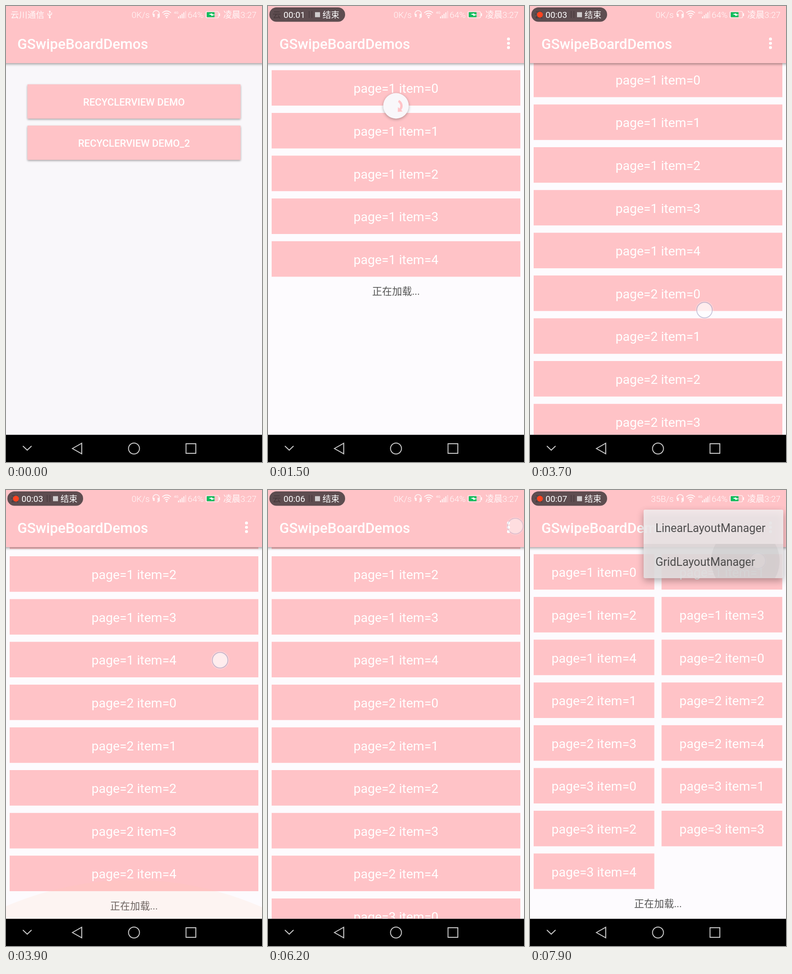
An HTML page with a canvas that plays this animation: 561x998 px, repeating every 8 s.

```html
<!DOCTYPE html>
<html lang="zh-CN">
<head>
<meta charset="utf-8">
<title>Refresh list demo</title>
<style>
html, body { margin: 0; width: 100%; height: 100%; overflow: hidden; background: #fdfbfe; }
canvas { display: block; width: 561px; height: 998px; }
</style>
</head>
<body>
<canvas id="stage"></canvas>
<script>
const W = 561, H = 998, LOOP = 8000;
const PINK = '#ffc3c7', TOP = 125, NAV = 938.5;
const ROW = 93.6, ROW_H = 77.7, FIRST = 140.4;
const FAMILY = 'Roboto, "Noto Sans CJK SC", "Noto Sans CJK", sans-serif';

const canvas = document.getElementById('stage');
const ctx = canvas.getContext('2d');
const dpr = window.devicePixelRatio || 1;
canvas.width = W * dpr;
canvas.height = H * dpr;

const clamp = v => Math.max(0, Math.min(1, v));
const span = (t, a, b) => clamp((t - a) / (b - a));
const smooth = p => (1 - Math.cos(Math.PI * p)) / 2;
const out = p => 1 - (1 - p) ** 3;

// Linear interpolation over [time, value] keys
function track(t, keys) {
  let [a, v] = keys[0];
  for (const [b, w] of keys) {
    if (t < b) return v + (w - v) * span(t, a, b);
    [a, v] = [b, w];
  }
  return v;
}

function text(s, x, y, size, color = '#fff', align = 'left', weight = 400) {
  ctx.font = `${weight} ${size}px ${FAMILY}`;
  ctx.fillStyle = color;
  ctx.textAlign = align;
  ctx.fillText(s, x, y);
}

function rect(x, y, w, h, color, r = 0) {
  ctx.fillStyle = color;
  ctx.beginPath();
  ctx.roundRect(x, y, w, h, r);
  ctx.fill();
}

function disc(x, y, r, color) {
  ctx.fillStyle = color;
  ctx.beginPath();
  ctx.arc(x, y, Math.max(0, r), 0, 7);
  ctx.fill();
}

function stroke(path, color, width) {
  ctx.strokeStyle = color;
  ctx.lineWidth = width;
  ctx.stroke(new Path2D(path));
}

function layer(alpha, draw) {
  if (alpha <= 0) return;
  ctx.save();
  ctx.globalAlpha *= alpha;
  draw();
  ctx.restore();
}

function shadow(alpha, blur, dy) {
  ctx.shadowColor = `rgba(0,0,0,${alpha})`;
  ctx.shadowBlur = blur * dpr;
  ctx.shadowOffsetY = dy * dpr;
}

function clipTo(x, y, w, h) {
  ctx.beginPath();
  ctx.rect(x, y, w, h);
  ctx.clip();
}

function toolbar(withMenu) {
  layer(1, () => {
    shadow(0.4, 6, 2);
    rect(-10, -100, W + 20, TOP + 100, PINK);
  });
  text('GSwipeBoardDemos', 25, 93.5, 31.2, '#fff', 'left', 500);
  if (withMenu) for (const y of [72.3, 81.6, 91]) disc(527, y, 3.2, '#fff');
}

function home(t) {
  rect(0, 0, W, H, '#f9f7fa');
  toolbar(false);
  ['RECYCLERVIEW DEMO', 'RECYCLERVIEW DEMO_2'].forEach((label, i) => {
    const y = 171.5 + i * 90.3;
    layer(1, () => {
      shadow(0.35, 4, 2);
      rect(47, y, 467, 75, PINK, 1);
    });
    if (!i) layer(span(t, 80, 150), () => {
      clipTo(47, y, 467, 75);
      disc(330, 212, 300 * out(span(t, 80, 500)), 'rgba(0,0,0,.07)');
    });
    text(label, 280.5, y + 46.5, 21.8, '#fff', 'center', 500);
  });
}

function items(t) {
  const grid = t >= 7800;
  const scroll = grid ? 0 : track(t, [[3600, 0], [3700, 17], [3800, 172], [3900, 182.5]]);
  const fades = [span(t, 1200, 1320), span(t, 2830, 3080), span(t, 5330, 5580)];
  for (let i = 0; i < 15; i++) {
    const page = Math.floor(i / 5);
    const row = grid ? Math.floor(i / 2) : i;
    const x = grid && i % 2 ? 288.3 : 8;
    const w = grid ? 264.5 : 545;
    const y = FIRST + row * ROW - scroll;
    if (y > NAV) continue;
    layer(fades[page], () => {
      rect(x, y, w, ROW_H, PINK);
      text(`page=${page + 1} item=${i % 5}`, x + w / 2, y + 50, 28, '#fff', 'center');
    });
  }
  const footerRow = grid ? 8
    : 5 + 5 * smooth(span(t, 2380, 2630)) + 5 * smooth(span(t, 4980, 5230));
  layer(fades[0], () =>
    text('正在加载...', 280.5, FIRST + footerRow * ROW + 23.7 - scroll, 21.8, '#555', 'center'));
}

function glow(t) {
  layer(track(t, [[3800, 0], [3900, 1], [4000, 1], [4400, 0]]), () =>
    disc(278, NAV + 615, 700, 'rgba(255,195,170,.14)'));
}

function spinner(t) {
  const p = smooth(span(t, 750, 1050)) - span(t, 1550, 2000);
  if (p <= 0) return;
  layer(1, () => {
    ctx.translate(280.5, TOP + 93.5 * p);
    ctx.scale(p, p);
    layer(1, () => {
      shadow(0.3, 6, 2);
      disc(0, 0, 28, '#f9f7fa');
    });
    ctx.rotate((t - 1500) / 190);
    const end = 0.75, start = end - 1.85 + 0.8 * Math.sin((t - 1500) / 210);
    ctx.strokeStyle = PINK;
    ctx.lineWidth = 5;
    ctx.beginPath();
    ctx.arc(0, 0, 12, start, end);
    ctx.stroke();
    ctx.rotate(end);
    ctx.fillStyle = PINK;
    ctx.fill(new Path2D('M5 -1H19L12 7Z'));
  });
}

function list(t) {
  rect(0, 0, W, H, '#fdfbfe');
  layer(1, () => {
    clipTo(0, TOP, W, NAV - TOP);
    items(t);
    glow(t);
    spinner(t);
  });
  toolbar(true);
}

function popup(t) {
  const p = out(span(t, 6270, 6600));
  const alpha = p * (1 - 0.15 * span(t, 7800, 7900) - 0.4 * span(t, 7900, 8000));
  layer(alpha, () => {
    ctx.translate(555, 43);
    ctx.scale(0.5 + p / 2, 0.3 + 0.7 * p);
    ctx.translate(-555, -43);
    layer(1, () => {
      shadow(0.35, 16, 6);
      rect(249, 43, 306, 150, '#f2f0f1', 3);
    });
    layer(span(t, 7550, 7700), () => {
      clipTo(249, 118, 306, 75);
      rect(249, 118, 306, 75, 'rgba(0,0,0,.05)');
      disc(472, 155, 75 * out(span(t, 7550, 7900)), 'rgba(0,0,0,.05)');
    });
    text('LinearLayoutManager', 275, 91.5, 24.9, '#333');
    text('GridLayoutManager', 275, 166, 24.9, '#333');
  });
}

function statusBar(t) {
  const pale = 'rgba(255,255,255,.9)';
  const pill = span(t, 100, 300);
  layer(1 - pill, () => {
    text('云川通信', 10, 26, 18.5, pale, 'left', 300);
    stroke('M96 11V26M92 16V19L96 23M100 14V18L96 21', pale, 1.5);
    disc(96, 25, 2, pale);
    disc(96, 12, 1.8, pale);
  });
  text(t < 7000 ? '0K/s' : '35B/s', 315, 26, 19, pale, 'right', 300);
  // headphones, wifi, signal
  stroke('M322 20V17A7 7 0 0 1 336 17V23Q336 26 331 26M323 18V23H325V18ZM335 18V23H333V18Z', pale, 1.6);
  stroke('M342.500 15Q352 7 361.500 15M345.500 18.500Q352 13 358.500 18.500M348.500 22Q352 19 355.500 22', pale, 1.7);
  disc(352, 25, 1.8, pale);
  text('4G', 368, 17, 8, pale);
  for (let i = 0; i < 5; i++)
    rect(377 + i * 3.9, 23 - i * 3, 2, 4 + i * 3, i < 4 ? pale : 'rgba(255,255,255,.45)');
  text('64%', 398, 26, 19, pale, 'left', 300);
  stroke('M441 12H463Q466 12 466 15V23Q466 26 463 26H441Q438 26 438 23V15Q438 12 441 12Z', pale, 1.2);
  rect(467, 16, 2, 6, pale);
  rect(440, 13.500, 17, 11, '#0cbd5c', 1);
  ctx.fillStyle = '#fff';
  ctx.fill(new Path2D('M444 18L452 16V18L458 19L450 22V20Z'));
  text('凌晨3:27', 549, 26, 18.8, pale, 'right', 300);
  layer(pill, () => recorder(t));
}

function recorder(t) {
  rect(3, 3, 166, 31.5, 'rgba(40,38,40,.75)', 15.75);
  text('云', 10, 26, 18.5, 'rgba(40,30,32,.45)', 'left', 300);
  rect(89.5, 11, 1.5, 15, 'rgba(40,30,32,.4)');
  rect(95.5, 11, 1.5, 15, 'rgba(40,30,32,.4)');
  const flips = [200, 700, 1000, 1450, 2200, 2850, 3400, 3950, 4400, 4800, 5400, 5900, 6400, 7000, 7300];
  if (flips.filter(f => f <= t).length % 2) disc(21.7, 19, 6.5, '#ff4420');
  const sec = [1200, 2200, 3400, 4400, 5400, 6150, 7300].filter(s => s <= t).length;
  text('00:0' + sec, 34, 26, 19);
  rect(103, 13.500, 11, 11, '#d0cccd');
  text('结束', 119.5, 26, 18.5);
}

function navBar() {
  rect(0, NAV, W, H - NAV, '#000');
  stroke('M37 963L46.500 972L56 963', '#ccc', 2);
  stroke('M145.500 968.500L166 957V980Z', '#ccc', 2);
  stroke('M268.500 968.500A12 12 0 1 0 292.500 968.500A12 12 0 1 0 268.500 968.500Z', '#ccc', 2);
  stroke('M394.500 958H416V979H394.500Z', '#ccc', 2);
}

function finger(x, y, alpha) {
  layer(alpha, () => {
    disc(x, y, 20, 'rgba(255,255,255,.25)');
    disc(x, y, 17, 'rgba(255,255,255,.6)');
    ctx.strokeStyle = 'rgba(150,145,185,.5)';
    ctx.lineWidth = 2;
    ctx.beginPath();
    ctx.arc(x, y, 17, 0, 7);
    ctx.stroke();
  });
}

function touches(t) {
  finger(330, 212, track(t, [[60, 0], [100, 1], [250, 1], [350, 0]]));
  finger(
    track(t, [[3600, 372], [3700, 382], [3900, 469], [4000, 490]]),
    track(t, [[3600, 700], [3700, 667], [3800, 512], [3900, 373], [4000, 320]]),
    track(t, [[3550, 0], [3600, 1], [3950, 1], [4050, 0]]));
  finger(542, 79, track(t, [[5790, 0], [5900, 0.6], [6200, 0.6], [6300, 0]]));
  finger(499, 155, track(t, [[7500, 0], [7600, 0.8], [7780, 0.8], [7900, 0.15], [7950, 0]]));
}

function render(t) {
  ctx.setTransform(dpr, 0, 0, dpr, 0, 0);
  const enter = out(span(t, 400, 750));
  if (enter < 1) home(t);
  layer(enter, () => {
    ctx.translate(0, 80 * (1 - enter));
    list(t);
  });
  rect(0, 0, W, 37, PINK);
  statusBar(t);
  popup(t);
  navBar();
  touches(t);
}

const began = performance.now();
function tick() {
  render((performance.now() - began) % LOOP);
  requestAnimationFrame(tick);
}
tick();
</script>
</body>
</html>
```
